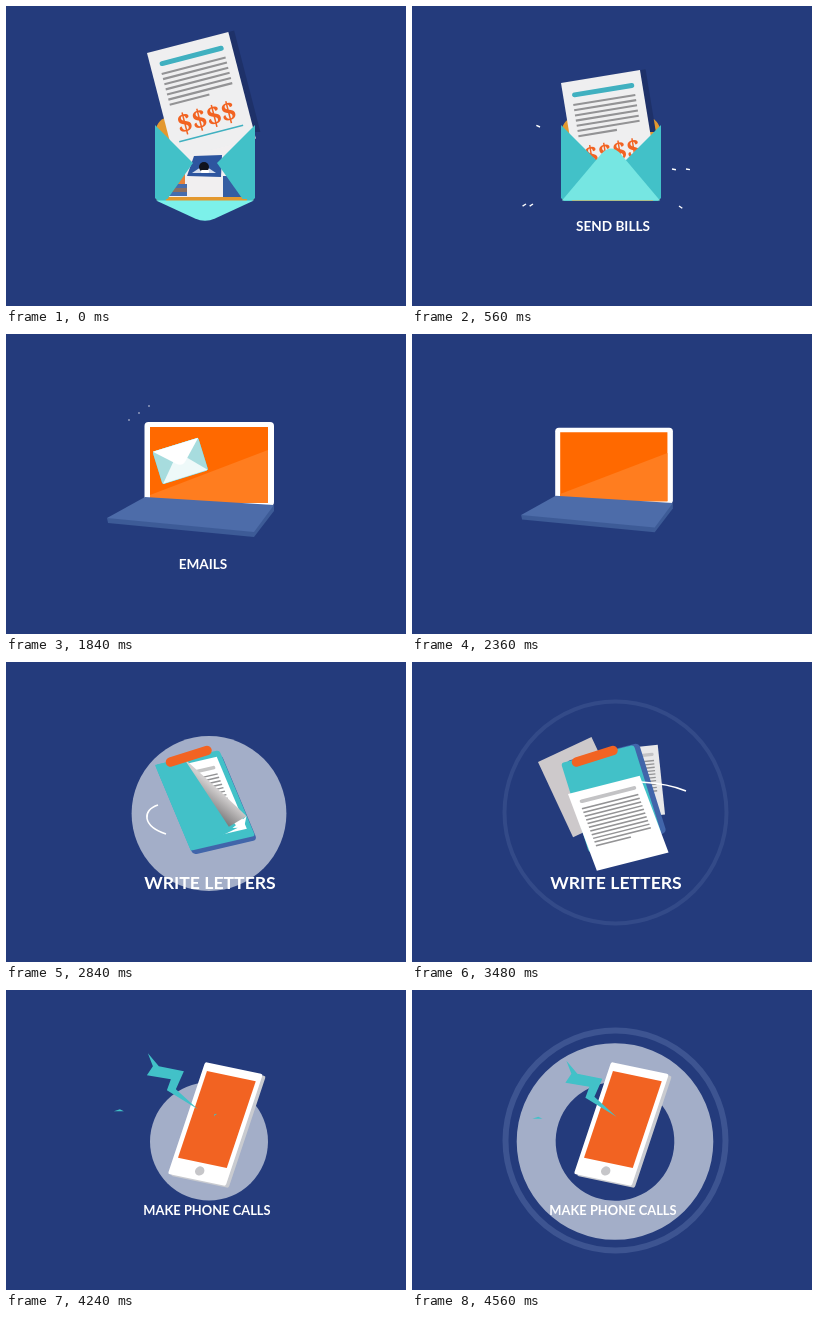
Write an HTML page with a canvas that moves like this. It is 400 px wide and 300 px high and loops after 4600 ms.

```html
<!DOCTYPE html>
<html lang="en">
<head>
<meta charset="utf-8">
<style>
html, body { margin: 0; width: 100%; height: 100%; overflow: hidden; background: #243b7c; }
canvas { display: block; }
</style>
</head>
<body>
<canvas id="stage" width="400" height="300"></canvas>
<script>
const ctx = document.getElementById('stage').getContext('2d');
const LOOP = 4600;
const BG = '#243b7c', TEAL = '#42c1c8', MINT = '#76e6e2', ORANGE = '#f26322', GOLD = '#e3982f', BLUE = '#4165aa';

const clamp = x => Math.max(0, Math.min(1, x));
const span = (t, a, b) => clamp((t - a) / (b - a));
const smooth = x => x * x * (3 - 2 * x);
const easeOut = x => 1 - (1 - x) ** 3;
const overshoot = x => 1 + 2.4 * (x - 1) ** 3 + 1.4 * (x - 1) ** 2;
const lerp = (a, b, k) => a + (b - a) * k;

// A sheet held at its top left corner; lean tilts its side edges, in degrees.
const pose = (x, y, w, h, turn, lean = -turn) => ({ x, y, w, h, turn, lean });
const between = (a, b, k) => Object.fromEntries(Object.keys(a).map(key => [key, lerp(a[key], b[key], k)]));
const shifted = (p, dx, dy) => ({ ...p, x: p.x + dx, y: p.y + dy });

function scoped(draw) { ctx.save(); draw(); ctx.restore(); }

function onPose(p, unitW, unitH, draw) {
  const turn = p.turn * Math.PI / 180, lean = p.lean * Math.PI / 180;
  const sx = p.w / unitW, sy = p.h / unitH;
  scoped(() => {
    ctx.transform(sx * Math.cos(turn), sx * Math.sin(turn), sy * Math.sin(lean), sy * Math.cos(lean), p.x, p.y);
    draw();
  });
}

function around(x, y, scale, angle, draw) {
  if (scale <= 0) return;
  scoped(() => {
    ctx.translate(x, y);
    ctx.rotate(angle);
    ctx.scale(scale, scale);
    ctx.translate(-x, -y);
    draw();
  });
}

function mirrored(axis, draw) {
  draw();
  scoped(() => {
    ctx.translate(2 * axis, 0);
    ctx.scale(-1, 1);
    draw();
  });
}

function clipTo(bottom, draw) {
  scoped(() => {
    ctx.beginPath();
    ctx.rect(0, 0, 400, bottom);
    ctx.clip();
    draw();
  });
}

function poly(color, ...xy) {
  ctx.fillStyle = color;
  ctx.beginPath();
  for (let i = 0; i < xy.length; i += 2) ctx.lineTo(xy[i], xy[i + 1]);
  ctx.fill();
}

function box(color, x, y, w, h, r = 0) {
  ctx.fillStyle = color;
  ctx.beginPath();
  ctx.roundRect(x, y, w, h, r);
  ctx.fill();
}

function line(color, width, x1, y1, x2, y2, cap = 'butt') {
  ctx.strokeStyle = color;
  ctx.lineWidth = width;
  ctx.lineCap = cap;
  ctx.beginPath();
  ctx.moveTo(x1, y1);
  ctx.lineTo(x2, y2);
  ctx.stroke();
}

function dot(color, x, y, r) {
  ctx.fillStyle = color;
  ctx.beginPath();
  ctx.arc(x, y, r, 0, 7);
  ctx.fill();
}

function swoosh(width, x, y, ...curve) {
  ctx.strokeStyle = '#fff';
  ctx.lineWidth = width;
  ctx.beginPath();
  ctx.moveTo(x, y);
  ctx.bezierCurveTo(...curve);
  ctx.stroke();
}

function caption(text, x, y, size, t, from, to) {
  if (t < from || t > to) return;
  scoped(() => {
    ctx.globalAlpha = span(t, from, from + 120) * (1 - span(t, to - 60, to));
    ctx.font = `bold ${size}px Lato, sans-serif`;
    ctx.textAlign = 'center';
    ctx.fillStyle = '#fff';
    ctx.fillText(text, x, y);
  });
}

const PAGE_W = 84, PAGE_H = 110;

function writing(accent, rows) {
  line(accent, 5, 12, 14, 73, 14, 'round');
  for (let i = 0; i < rows; i++) {
    const y = 24 + i * 5.3;
    line('#939395', 2.1, 9, y, i === rows - 1 ? 50 : 75, y);
  }
}

function page(p, paper, accent, rows) {
  onPose(p, PAGE_W, PAGE_H, () => {
    box(paper, 0, 0, PAGE_W, PAGE_H);
    if (rows) writing(accent, rows);
  });
}

// ---- Bills
const billHigh = pose(141, 47, 84, 110, -14.5);
const billLow = pose(149, 77, 80, 109, -9.3);
const billIn = pose(156, 134, 80, 109, -3);

function bill(t) {
  const p = t < 600
    ? between(billHigh, billLow, smooth(span(t, 0, 560)))
    : between(billLow, billIn, smooth(span(t, 600, 880)));
  clipTo(126, () => onPose(p, PAGE_W, PAGE_H, () => box('#1e3169', 4, 0, 86, PAGE_H)));
  clipTo(192, () => {
    page(p, '#efeff0', '#40b0c0', 7);
    onPose(p, PAGE_W, PAGE_H, () => {
      ctx.font = '900 27px "Noto Serif", serif';
      ctx.textAlign = 'center';
      ctx.fillStyle = ORANGE;
      for (let i = 0; i < 4; i++) ctx.fillText('$', 19 + i * 15, 87);
      line('#40b0c0', 1.4, 9, 94, 75, 94);
    });
  });
}

function enclosures() {
  box('#f1eff0', 162, 134, 76, 57);
  box('#e6813a', 165, 151, 14, 27);
  for (let i = 0; i < 3; i++) box(i % 2 ? '#8b6e61' : '#466dae', 162, 178 + i * 4, 19, 4);
  box('#355da2', 217, 170, 22, 21);
  poly('#2d559f', 188, 150, 216, 149, 215, 171, 181, 170);
  poly('#d3dced', 186, 167, 198, 159, 210, 167);
  dot('#10131c', 198, 161, 5);
  box('#fff', 195, 164, 8, 3, 1);
}

function sealed(side, bottom, top) {
  box(side, 149.5, 124, 98.5, 70, 4);
  poly(bottom, 151, 193, 190, 150, 199, 145, 208, 150, 247, 193);
  flap(top, 124, 167);
}

function flap(color, base, tip) {
  const shoulder = lerp(base, tip, .88);
  ctx.fillStyle = color;
  ctx.beginPath();
  ctx.moveTo(150, base);
  ctx.lineTo(189, shoulder);
  ctx.quadraticCurveTo(199, lerp(base, tip, 1.1), 209, shoulder);
  ctx.lineTo(248, base);
  ctx.fill();
}

function openEnvelope(t) {
  box(GOLD, 150, 111, 98, 84, [14, 14, 4, 4]);
  if (t < 440) enclosures();
  bill(t);
  mirrored(199, () => poly(TEAL, 149, 119, 187, 157, 160, 195, 152, 195, 149, 192));
  line(GOLD, 2, 160, 194, 241, 194);
  const fold = smooth(span(t, 60, 420));
  flap(fold < .5 ? '#7cf1ea' : MINT, 194.5, lerp(215, 142, fold));
  const shut = smooth(span(t, 860, 1080));
  if (shut) flap('#8df2ee', 124, lerp(111, 166, shut));
}

function sparks(t) {
  if (t < 120 || t > 590) return;
  const reach = 4 + 56 * (1 - easeOut(span(t, 120, 560)));
  for (const side of [-1, 1]) {
    for (let i = 0; i < 3; i++) {
      const x = 194 + side * (66 + i * 7);
      const y = side < 0 ? 121 + 77 * Math.sign(i) : 163 + 37 * (i % 2);
      const a = Math.atan2(y - 150, x - 194);
      line('#fff', 1.4, x, y, x + reach * Math.cos(a), y + reach * Math.sin(a));
    }
  }
}

function bills(t) {
  if (t < 1120) openEnvelope(t);
  sparks(t);
}

// ---- Emails
function laptop() {
  box('#fff', 138.5, 88, 129.5, 84, 4);
  box('#ff6900', 144, 93, 118, 76);
  poly('#ff7d1f', 144, 161, 262, 116, 262, 169, 144, 169);
  poly('#3d5b97', 101, 184, 268, 172, 268, 177, 248, 203, 102, 189);
  poly('#4d6ca9', 101, 184, 139, 163, 268, 171, 248, 198);
}

function mail(whiteness) {
  sealed(TEAL, MINT, '#8df2ee');
  scoped(() => {
    ctx.globalAlpha = whiteness;
    sealed('#a7dcde', '#eef9f9', '#fff');
  });
}

function emails(t) {
  if (t < 1120 || t > 2560) return;
  const size = overshoot(span(t, 1520, 1780)) * (1 - smooth(span(t, 2320, 2540)));
  if (t > 1520) around(190, 150, size, 0, laptop);
  const move = smooth(span(t, 1180, 1840));
  const drift = smooth(span(t, 1840, 2040));
  const leave = smooth(span(t, 2040, 2300));
  scoped(() => {
    ctx.translate(22 * drift - 24.5 * move, -32 * move);
    around(199, 159, lerp(1, .485, move) * (1 - leave), .3 * (drift - move),
      () => mail(smooth(span(t, 1300, 1720))));
  });
  if (t > 1720 && t < 1900) {
    const r = 1.6 * (1 - span(t, 1740, 1920));
    for (let i = 0; i < 3; i++) dot('#fff', 123 + i * 10, 86 - i * 7, r);
  }
}

// ---- Halo shared by the last two scenes
function halo(t, appear, spread, end) {
  if (t < appear || t > end) return;
  const age = t - spread;
  const grown = clamp(age / 400) ** .9;
  const radius = age < 0 ? 59 * overshoot(span(t, appear, appear + 140)) : 59 + 54 * grown;
  const hole = 110 * clamp((age - 130) / 280);
  if (age > 200) {
    scoped(() => {
      ctx.globalAlpha = 1 - span(t, end - 260, end);
      ctx.strokeStyle = '#3d5491';
      ctx.lineWidth = lerp(6, 4, span(age, 280, 600));
      ctx.beginPath();
      ctx.arc(203.5, 150.5, 113 - ctx.lineWidth / 2, 0, 7);
      ctx.stroke();
    });
  }
  if (age > 410 || radius <= 0) return;
  ctx.fillStyle = '#a3aec8';
  ctx.beginPath();
  ctx.arc(203, 151.5, radius, 0, 7);
  if (hole > 0) ctx.arc(203, 151.5, hole, 7, 0, true);
  ctx.fill('evenodd');
}

// ---- Letters
const BOARD_W = 66, BOARD_H = 93;
const boardClosed = pose(149, 103, 66, 93, -13, 22.7);
const boardOpen = pose(149, 101, 75, 94, -14, 17.3);
const tucked = pose(165, 105, 42, 65, -15, 22);
const leftPage = pose(126, 100, 59, 83, -25), leftAway = pose(-29, 18, 86, 62, 8, -33);
const rightPage = pose(196, 88, 50, 70, -6), rightAway = pose(520, 60, 60, 70, 30);
const frontPage = pose(156, 132, 74, 82, -14.2, 20.6), frontAway = pose(119, 275, 80, 36, 27, -25);

// The cover folds back along a line that sweeps across the board.
function peelingCover(p) {
  const top = BOARD_W * (1 - p), low = BOARD_W * (1 - p * p * .65), bottom = BOARD_H - 12;
  const lift = 16 * Math.sin(Math.PI * p);
  poly(TEAL, 0, 0, top, 0, low, bottom, 0, BOARD_H);
  if (p <= 0) return;
  const shade = ctx.createLinearGradient(low - 24, bottom - 30, low - 4, bottom - 42);
  shade.addColorStop(0, '#7c7a7b');
  shade.addColorStop(1, '#d2cfcf');
  ctx.fillStyle = shade;
  ctx.beginPath();
  ctx.moveTo(top, 0);
  ctx.quadraticCurveTo(lerp(top, low, .7) + 7, bottom * .55, low + lift * .8, bottom - lift * .6);
  ctx.lineTo(low - 8, bottom - 3);
  ctx.fill();
  poly('#fff', low + lift * .8, bottom - lift * .6, low + 6, bottom + 1, low - 5, bottom - 1);
}

function clipboard(t) {
  const k = smooth(span(t, 3040, 3440));
  const board = between(boardClosed, boardOpen, k);
  const rim = shifted(board, lerp(2, 5, k), lerp(4, -2, k));
  onPose(rim, BOARD_W, BOARD_H, () => box(BLUE, 0, 0, BOARD_W, BOARD_H, 4));
  onPose(board, BOARD_W, BOARD_H, () => {
    box(TEAL, 0, 0, BOARD_W, BOARD_H, 3);
    const peel = span(t, 2640, 3004);
    if (t > 3240) return;
    page(pose(7, 6, 54, 78, 0), '#fff', '#c5c5c5', 11);
    if (peel < 1) peelingCover(peel);
  });
}

function flying(rest, away, t, paper, rows) {
  if (t < 3160) return;
  const p = t < 3500
    ? between(tucked, rest, easeOut(span(t, 3160, 3460)))
    : between(rest, away, ((t - 3500) / 420) ** 1.4);
  page(p, paper, '#c3c3c5', rows);
}

function letters(t) {
  if (t < 2560 || t > 4200) return;
  const size = overshoot(span(t, 2560, 2720)) * (1 - smooth(span(t, 3520, 3720)));
  clipTo(286, () => {
    flying(leftPage, leftAway, t, t < 3600 ? '#cdc9cb' : '#bcbcbe', 0);
    flying(rightPage, rightAway, t, '#e8e8e9', 11);
    around(203, 140, size, 0, () => clipboard(t));
    flying(frontPage, frontAway, t, '#fff', 11);
    around(203, 140, size, 0, () => line(ORANGE, 9.5, 164.5, 100, 201, 88.5, 'round'));
  });
  if (t > 2760 && t < 2920) swoosh(1.6, 152, 143, 136, 148, 136, 164, 160, 172);
  if (t > 3400 && t < 3560) swoosh(1.4, 229, 120, 245, 121, 260, 123, 274, 129);
}

// ---- Phone calls
const phoneTilted = pose(214, 84, 51, 93, 30.4, -31.7);
const phoneUpright = pose(199, 72, 59, 118, 11.7, -18.3);

function phone(k) {
  const body = between(phoneTilted, phoneUpright, k);
  onPose(shifted(body, 3 * k, 2), 58, 112, () => box('#c9cbd0', 0, 0, 58, 112, 2));
  onPose(body, 58, 112, () => {
    box('#fff', 0, 0, 58, 112, 2);
    box(ORANGE, 4.5, 8, 49, 87);
    dot('#c6c6c9', 29, 103, 4.5);
  });
}

function rays(t) {
  const k = (t - 3920) / 130;
  if (k < -.7 || k > 1) return;
  for (const side of [-1, 1]) {
    for (let i = -1; i <= 1; i++) {
      const diagonal = Math.abs(i);
      const length = (side < 0 ? 29 + 12 * diagonal : 16 + 22 * diagonal);
      const near = (side < 0 ? 51 : 78) + 24 * diagonal + length * k;
      const far = near + length * (1 - Math.max(0, k));
      const dx = side * Math.cos(.54 * i), dy = Math.sin(.54 * i);
      line('#e0703c', 1.5, 203 + near * dx, 155 + near * dy, 203 + far * dx, 155 + far * dy);
    }
  }
}

function bolt() {
  poly(TEAL, 155, 71, 166, 84, 191, 89, 183, 107, 205, 127, 174, 108, 178, 97, 154, 93, 160, 84);
  poly(TEAL, 121, 129, 127, 127, 131, 129);
}

function lightning(t, start, flip) {
  const k = span(t, start, start + 160);
  if (k <= 0 || t > start + 240) return;
  const away = 50 * span(t, start + 160, start + 240);
  scoped(() => {
    if (flip) { ctx.translate(412, 0); ctx.scale(-1, 1); }
    ctx.translate(-away, -away * .6);
    around(205, 127, k, 0, bolt);
  });
}

function calls(t) {
  if (t < 3720) return;
  rays(t);
  const ring = t > 3920 ? .06 * Math.sin((t - 3920) / 160 * 2 * Math.PI) : 0;
  around(211, 137, overshoot(span(t, 3720, 3900)), ring, () => phone(smooth(span(t, 3920, 4200))));
  if (t > 3840 && t < 4000) {
    swoosh(2, 143, 132, 112, 139, 138, 172, 238, 171);
    line('#7d6a55', 1, 201, 147, 205, 149);
  }
  for (let i = 0; i < 3; i++) lightning(t, 4060 + i * 170, i === 1);
}

function render(t) {
  ctx.fillStyle = BG;
  ctx.fillRect(0, 0, 400, 300);
  bills(t);
  emails(t);
  halo(t, 2560, 2720, 3640);
  halo(t, 3760, 4280, 4900);
  letters(t);
  calls(t);
  caption('SEND BILLS', 201, 225, 13.6, t, 320, 1200);
  caption('EMAILS', 197, 235, 13.6, t, 1400, 2360);
  caption('WRITE LETTERS', 204, 227, 17.6, t, 2600, 3600);
  caption('MAKE PHONE CALLS', 201, 225, 12.9, t, 3720, 4700);
}

function frame() {
  render(performance.now() % LOOP);
  requestAnimationFrame(frame);
}
frame();
</script>
</body>
</html>
```
